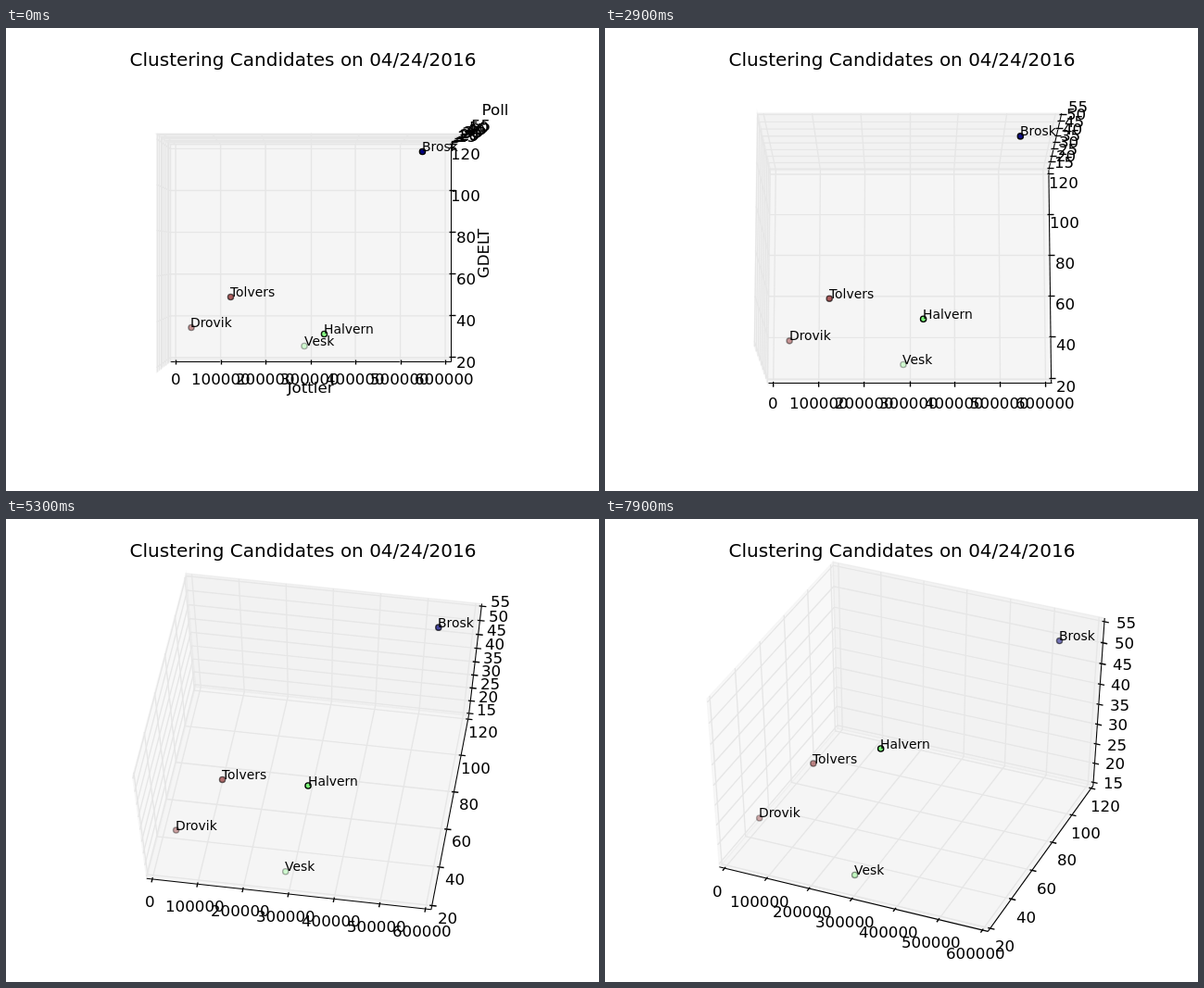
An HTML page with a canvas for the animation above (8000 ms loop, 640 by 500 pixels).

```html
<!DOCTYPE html>
<html lang="en">
<head>
<meta charset="utf-8">
<title>Clustering Candidates</title>
<style>
  html, body { margin: 0; width: 100%; height: 100%; overflow: hidden; background: #fff; }
  canvas { display: block; }
</style>
</head>
<body>
<canvas id="stage" width="640" height="500"></canvas>
<script>
const ctx = document.getElementById('stage').getContext('2d');

const LOOP = 8000, HOLD = 500, STEP = 200, LAST = 38;
const CENTER = [328.6, 243.2];
const SCALE = [3467.7, 2689];
const DIST = 11.4;
const H = 0.5 + 1 / 48;           // pane half size, unit cube centred on 0
const TICK = 1 / 12;
const LABEL = H + 0.06;
const PT = 100 / 72;
const FONT = '"DejaVu Sans", sans-serif';

const RED = '127,0,0', GREEN = '124,255,121', NAVY = '0,0,127';
const points = [
  { name: 'Brosk',   pos: [0.3835, 0.4488, 0.3973],    rgb: NAVY },
  { name: 'Tolvers', pos: [-0.2843, -0.2014, -0.052],  rgb: RED },
  { name: 'Drovik',  pos: [-0.4348, -0.3502, -0.3243], rgb: RED },
  { name: 'Halvern', pos: [0.0477, -0.3606, 0.2944],   rgb: GREEN },
  { name: 'Vesk',    pos: [-0.0225, -0.4419, -0.4485], rgb: GREEN }
];

const panes = [
  { shade: 242, corners: [[-H, -H, -H], [-H, H, -H], [-H, H, H], [-H, -H, H]] },
  { shade: 230, corners: [[-H, H, -H], [H, H, -H], [H, H, H], [-H, H, H]] },
  { shade: 236, corners: [[-H, -H, -H], [H, -H, -H], [H, H, -H], [-H, H, -H]] }
];

// at(v, r): point on the axis edge; r moves it along the tick direction
const axes = [
  {
    min: 0, max: 600000, step: 100000,
    at: (v, r = H) => [v, -r, -H],
    label: v => [v, -LABEL, -LABEL],
    grid: v => [[v, -H, -H], [v, H, -H], [v, H, H]]
  },
  {
    min: 20, max: 120, step: 20,
    at: (v, r = H) => [r, v, -H],
    label: v => [LABEL, v, -LABEL],
    grid: v => [[H, v, -H], [-H, v, -H], [-H, v, H]]
  },
  {
    min: 15, max: 55, step: 5,
    at: (v, r = H) => [r, H, v],
    label: v => [LABEL, LABEL, v],
    grid: v => [[H, H, v], [-H, H, v], [-H, -H, v]]
  }
];

const rad = deg => deg * Math.PI / 180;

function camera(k) {
  const tilt = Math.max(0, k - 1) + 0.5 * Math.max(0, k - 17);
  const elev = rad(90 - tilt), turn = rad(1.1 * Math.max(0, k - 17));
  const s = Math.sin(elev), c = Math.cos(elev);
  const sa = Math.sin(turn), ca = Math.cos(turn);
  return ([x, y, z]) => {
    const right = x * ca + y * sa;
    const away = y * ca - x * sa;
    const w = DIST + away * c - z * s;
    return [
      CENTER[0] + SCALE[0] * right / w,
      CENTER[1] - SCALE[1] * (away * s + z * c) / w,
      w
    ];
  };
}

const same = (a, b) => Math.abs(a - b) < 1e-4;

// Paths made only of level and upright segments sit on pixel centres
function trace(project, list) {
  const path = list.map(project);
  const straight = path.every((p, i) =>
    i === 0 || same(p[0], path[i - 1][0]) || same(p[1], path[i - 1][1]));
  ctx.beginPath();
  for (const [x, y] of path) {
    if (straight) ctx.lineTo(Math.round(x) + 0.5, Math.round(y) - 0.5);
    else ctx.lineTo(x, y);
  }
}

function line(project, list, color, width) {
  trace(project, list);
  ctx.strokeStyle = color;
  ctx.lineWidth = width;
  ctx.stroke();
}

function text(str, x, y, size) {
  ctx.font = `${size}px ${FONT}`;
  ctx.textAlign = 'center';
  ctx.fillStyle = '#000';
  ctx.fillText(str, x, y);
}

// Text on whole pixels; anchor 0 starts at x, 0.5 is centred on it
function label(str, x, y, size, anchor) {
  ctx.font = `${size}px ${FONT}`;
  ctx.textAlign = 'left';
  ctx.fillStyle = '#000';
  const left = x - anchor * ctx.measureText(str).width;
  ctx.fillText(str, Math.floor(left), Math.floor(y));
}

function drawPane(project, { shade, corners }) {
  trace(project, corners);
  ctx.closePath();
  ctx.fillStyle = ctx.strokeStyle = `rgba(${shade},${shade},${shade},0.5)`;
  ctx.lineWidth = PT;
  ctx.fill();
  ctx.stroke();
}

function drawAxis(project, axis) {
  const ticks = [];
  for (let n = axis.min; n <= axis.max; n += axis.step) {
    ticks.push([n, (n - axis.min) / (axis.max - axis.min) - 0.5]);
  }
  line(project, [axis.at(-H), axis.at(H)], '#000', 0.75 * PT);
  for (const [, v] of ticks) line(project, axis.grid(v), '#e6e6e6', PT);
  for (const [n, v] of ticks) {
    line(project, [axis.at(v, H - 0.1 * TICK), axis.at(v, H + 0.2 * TICK)], '#000', PT);
    const [x, y] = project(axis.label(v));
    label(String(n), x, y + 12, 12 * PT, 0.5);
  }
}

function drawTitles() {
  text('Jottler', 328.6, 394, 12 * PT);
  text('Poll', 528, 94, 12 * PT);
  ctx.save();
  ctx.translate(520.5, 243.5);
  ctx.rotate(-Math.PI / 2);
  text('GDELT', 0, 0, 12 * PT);
  ctx.restore();
}

function drawPoints(project) {
  const spots = points.map(p => project(p.pos));
  const depth = spots.map(s => -1 / s[2]);
  const near = Math.min(...depth), far = Math.max(...depth);
  points.forEach(({ rgb }, i) => {
    const alpha = 1 - 0.7 * (depth[i] - near) / (far - near);
    ctx.beginPath();
    ctx.arc(spots[i][0], spots[i][1], Math.sqrt(20) / 2 * PT, 0, 2 * Math.PI);
    ctx.fillStyle = `rgba(${rgb},${alpha})`;
    ctx.fill();
    ctx.strokeStyle = `rgba(0,0,0,${alpha})`;
    ctx.lineWidth = PT;
    ctx.stroke();
  });
  points.forEach(({ name }, i) => label(name, spots[i][0], spots[i][1], 10 * PT, 0));
}

function draw(k) {
  const project = camera(k);
  ctx.fillStyle = '#fff';
  ctx.fillRect(0, 0, 640, 500);
  panes.forEach(p => drawPane(project, p));
  axes.forEach(a => drawAxis(project, a));
  if (k === 0) drawTitles();
  drawPoints(project);
  text('Clustering Candidates on 04/24/2016', 320.5, 41, 20);
}

const start = performance.now();

function frame() {
  const t = (performance.now() - start) % LOOP;
  draw(t < HOLD ? 0 : Math.min(LAST, 1 + Math.floor((t - HOLD) / STEP)));
  requestAnimationFrame(frame);
}
frame();
</script>
</body>
</html>
```
